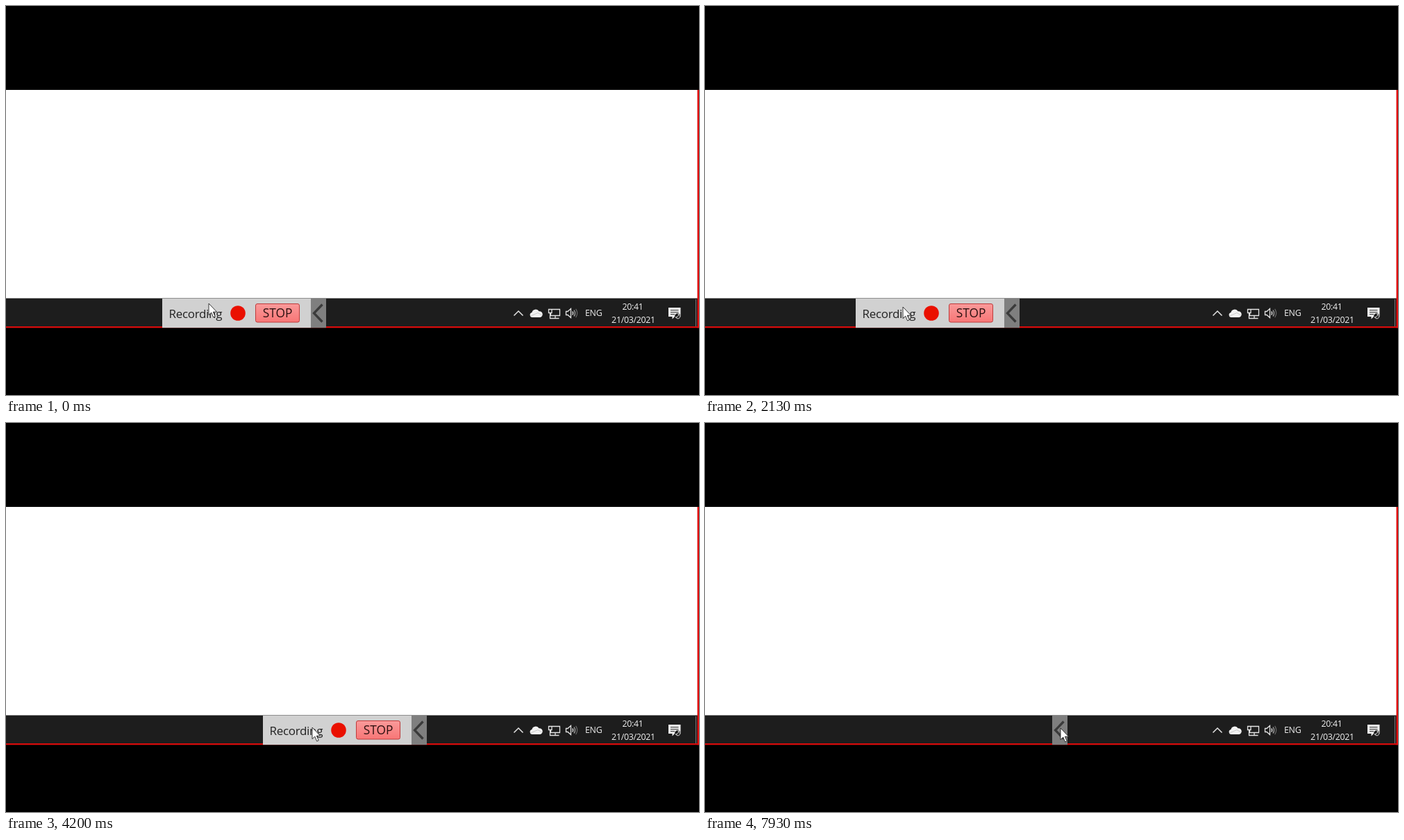
Recreate the animation shown at these times as an HTML page. Size 998x561 px, loop 8 s.

```html
<!DOCTYPE html>
<html lang="en">
<head>
<meta charset="utf-8">
<title>Recording toolbar</title>
<style>
  html, body { margin: 0; width: 100%; height: 100%; overflow: hidden; background: #000; }
  svg { display: block; width: 998px; height: 561px; }
  text { font-family: "Open Sans", "Noto Sans", sans-serif; }
  .label { font-size: 17px; letter-spacing: -.3px; fill: #222; }
  .stop { font-size: 17.3px; fill: #2c1010; }
  .tray { fill: none; stroke: #e4e4e4; stroke-width: 1.3; }
  .tray text { stroke: none; fill: #f0f0f0; font-size: 12.4px; letter-spacing: -.3px; }
  .solid { fill: #f2f2f2; stroke: none; }
</style>
</head>
<body>
<svg viewBox="0 0 998 561">
  <defs>
    <linearGradient id="button" x2="0" y2="1">
      <stop offset="0" stop-color="#f99a9a"/>
      <stop offset="1" stop-color="#f87676"/>
    </linearGradient>
  </defs>

  <rect width="998" height="561"/>
  <rect y="121" width="998" height="301" fill="#fff"/>
  <rect y="421.5" width="998" height="42.5" fill="#1d1d1d"/>
  <path d="M993.5 423V462" stroke="#777"/>
  <path d="M0 463.2H998" stroke="#d60b0b" stroke-width="2.2"/>
  <path d="M996.8 121V464.3" stroke="#e00c0c" stroke-width="2.4"/>

  <g class="tray">
    <path d="M731.5 446.5L738 440L744.5 446.5" stroke-width="1.5"/>
    <path class="solid" d="M758 449a3.6 3.6 0 0 1 -.6-7.1a5.6 5.6 0 0 1 10.2-1.6a4.4 4.4 0 0 1 1.4 8.7z"/>
    <path d="M755.5 447L766 442.5L771.5 446" stroke="#c9c9c9" stroke-width="1"/>
    <path d="M786 437.5H797.5V446.5H784.5V443M791 446.5V450.5M786 450.5H796.5M781.5 437.5H786V442.5H781.5ZM783.5 442.5V450.5H786"/>
    <path d="M806.5 440.5H809L813.5 436.5V449.5L809 445.5H806.5ZM815.8 440.5Q817.6 443 815.8 445.5"/>
    <path d="M818 438.5Q821 443 818 447.5" stroke="#aaa"/>
    <path d="M820.6 436.8Q824.6 443 820.6 449.2" stroke="#666"/>
    <text x="834" y="447.3">ENG</text>
    <g text-anchor="middle">
      <text x="902.5" y="437.8">20:41</text>
      <text x="903.5" y="457">21/03/2021</text>
    </g>
    <path class="solid" d="M954 435H971.5V448H963L959.5 451.5V448H954Z"/>
    <path d="M957 438.7H968.5M957 441.7H968.5M957 444.7H963" stroke="#222" stroke-width="1.1"/>
    <circle cx="967.3" cy="447.5" r="4.2" fill="#1d1d1d" stroke="none"/>
    <path d="M968.2 444.3A3.3 3.3 0 1 1 964.4 448.6A3.2 3.2 0 0 0 968.2 444.3Z" stroke-width="1"/>
  </g>

  <g id="panel">
    <g id="body">
      <rect y="422" width="214" height="42" fill="#d1d1d1"/>
      <text class="label" x="9.5" y="450">Recording</text>
      <circle cx="109" cy="443" r="10.8" fill="#ea1000"/>
      <rect x="134.5" y="429.5" width="63" height="26.5" rx="2.5" fill="url(#button)" stroke="#bd3b3b"/>
      <text class="stop" x="166" y="449.3" text-anchor="middle">STOP</text>
    </g>
    <rect x="214" y="422" width="22" height="42" fill="#7f7f7f"/>
    <path d="M230.5 430.5L218.5 443L230.5 455.5" fill="none" stroke="#3b3b3b" stroke-width="3.3"/>
  </g>

  <path id="cursor" d="M0 0V16.6L3.8 13.1L6.6 19.9L9.2 18.8L6.4 12.2H11.6Z" fill="#fff" stroke="#222" stroke-width=".9"/>
</svg>
<script>
const LOOP = 8000, FPS = 15, GRIP = 70;
const DRAG_END = 78, COLLAPSE = 101, LAST = 119;

// [step, position]
const panelX = [[0, 225], [5, 225], [18, 407], [20, 407], [24, 362], [33, 198], [40, 67],
  [41, 65], [42, 65], [46, 88], [54, 229], [59, 321], [65, 380], [72, 314], [73, 305],
  [77, 285], [118, 285], [119, 286]];
const releaseX = [[78, 355], [90, 511], [118, 511], [119, 512]];
const cursorY = [[0, 429], [1, 430], [5, 430], [24, 432], [40, 436], [54, 437], [73, 440],
  [78, 440], [84, 443], [90, 440], [119, 440]];

// Monotone cubic curve through the keys: flat at turning points and ends.
function curve(keys, at) {
  const slope = i => (keys[i + 1][1] - keys[i][1]) / (keys[i + 1][0] - keys[i][0]);
  const tangent = i => {
    if (i === 0 || i === keys.length - 1) return 0;
    const a = slope(i - 1), b = slope(i);
    return a * b <= 0 ? 0 : 2 * a * b / (a + b);
  };
  let i = 0;
  while (i < keys.length - 2 && at >= keys[i + 1][0]) i++;
  const [t0, p0] = keys[i], [t1, p1] = keys[i + 1], span = t1 - t0;
  const u = Math.min(1, Math.max(0, (at - t0) / span)), v = 1 - u;
  return p0 * v * v * (1 + 2 * u) + p1 * u * u * (3 - 2 * u)
    + span * u * v * (v * tangent(i) - u * tangent(i + 1));
}

function cursorX(step) {
  if (step === 0) return 292;
  if (step >= DRAG_END) return curve(releaseX, step);
  const x = curve(panelX, step);
  return x + GRIP + 0.1 * (x - curve(panelX, step - 1));
}

const [panel, body, cursor] = ["panel", "body", "cursor"].map(id => document.getElementById(id));
const place = (node, x, y) =>
  node.setAttribute("transform", `translate(${Math.round(x)} ${Math.round(y)})`);

function draw() {
  const time = performance.now() % LOOP;
  const step = Math.min(LAST, Math.floor(time * FPS / 1000 + 0.06));
  place(panel, curve(panelX, step), 0);
  place(cursor, cursorX(step), curve(cursorY, step));
  body.setAttribute("visibility", step < COLLAPSE ? "visible" : "hidden");
  requestAnimationFrame(draw);
}
draw();
</script>
</body>
</html>
```
